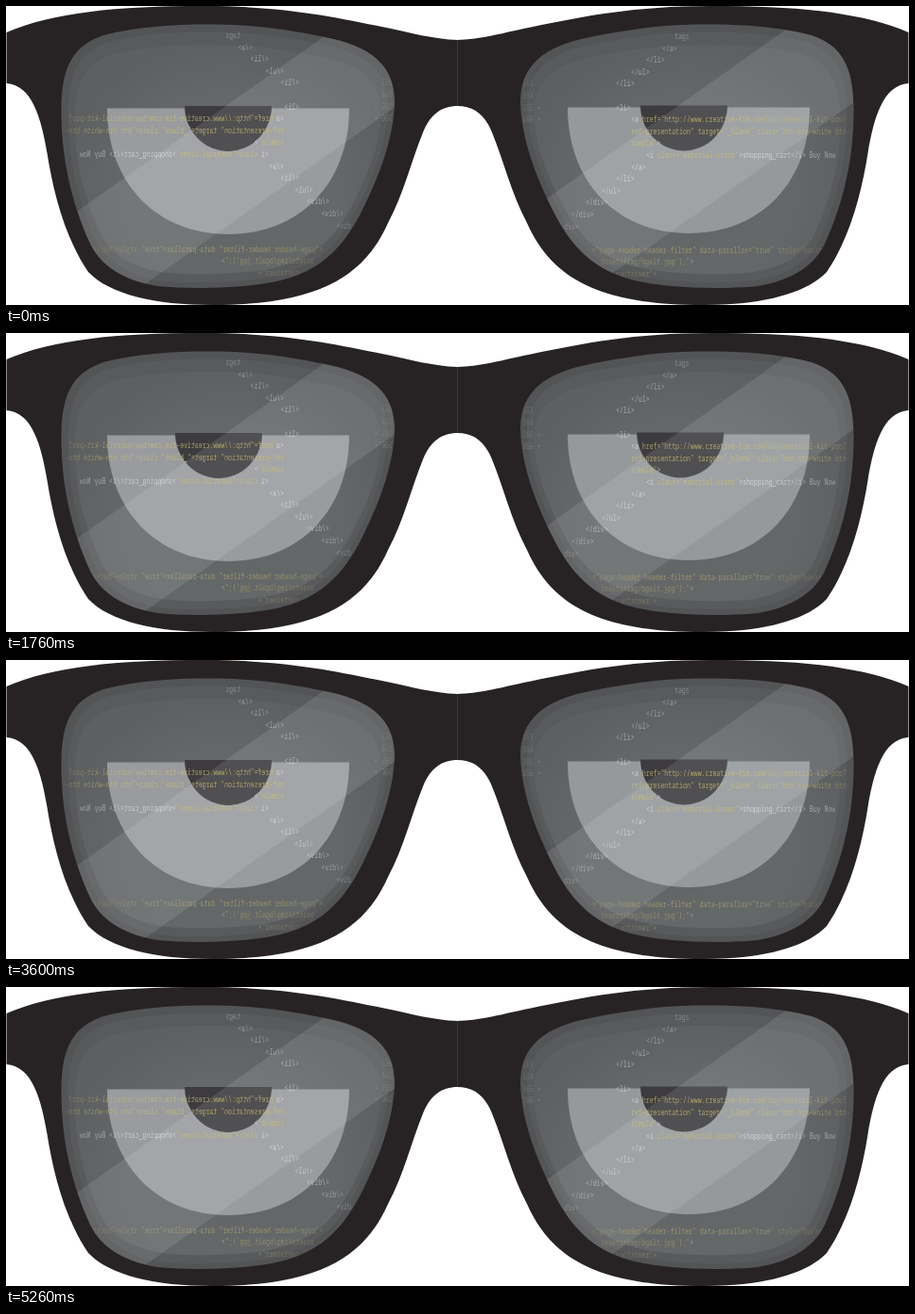
These frames come from a looping animation (955 by 317 pixels, 6 s). An HTML page:

```html
<!DOCTYPE html>
<html lang="en">
<head>
<meta charset="utf-8">
<title>Glasses</title>
<style>
  html, body { margin: 0; width: 100%; height: 100%; overflow: hidden; background: #fff; }
  svg { display: block; width: 100%; height: 100%; }
  text { font: 8.2px "Noto Sans Mono", "DejaVu Sans Mono", monospace; white-space: pre; }
  .tag { fill: #e4e5e6; }
  .attr { fill: #cfc272; }
  .eye { transform-origin: 0 159.5px; }
</style>
</head>
<body>
<svg viewBox="0 0 955 317" xmlns="http://www.w3.org/2000/svg">
  <defs>
    <path id="lens" d="M58.500 108 C59 64 71 42 103 31 C140 21 185 19 225 19.500 C265 20 302 26 335 32.500 C385 42 411 62 411 102 C410 140 395 180 377 216 C358 254 335 280 290 291 C258 299 200 301 160 297 C126 291 101 277 89 252 C69 208 58 160 58.500 108 Z"/>
    <path id="rim" d="M.5 28 C50 7 115 0 210 0 C290 0 345 11 400 22.500 C430 28.500 450 35 478 36 V106 C460 106 449 115 441 134 C428 166 421 198 404 230 C379 286 332 317 218 317 C158 317 110 306 87 282 C62 245 50 197 43.500 156 C37 119 28 84 .5 82 Z"/>
    <path id="eye" d="M-128 108 H128 C128 187 76 241.500 0 241.500 C-76 241.500 -128 187 -128 108 Z"/>
    <path id="pupil" d="M-46 106 H46 A46 48 0 0 1 -46 106 Z"/>
    <path id="glare" d="M50 235.600 L360 15.500 L440 30 V87 L130 307 Z"/>
    <radialGradient id="tint" gradientUnits="userSpaceOnUse" cx="0" cy="0" r="1"
      gradientTransform="translate(236 195) scale(196 182)">
      <stop offset="0" stop-color="#626466"/>
      <stop offset=".6" stop-color="#656869"/>
      <stop offset="1" stop-color="#5d5f61"/>
    </radialGradient>
    <radialGradient id="fade" gradientUnits="userSpaceOnUse" cx="0" cy="0" r="1"
      gradientTransform="translate(728 158) scale(190 150)">
      <stop offset=".35" stop-color="#fff"/>
      <stop offset=".7" stop-color="#aaa"/>
      <stop offset="1" stop-color="#333"/>
    </radialGradient>
    <mask id="soft" maskUnits="userSpaceOnUse" x="478" y="0" width="477" height="317">
      <rect x="478" width="477" height="317" fill="url(#fade)"/>
    </mask>
    <clipPath id="clipL"><use href="#lens"/></clipPath>
    <clipPath id="clipR"><use href="#lens" transform="matrix(-1 0 0 1 955 0)"/></clipPath>
    <g id="side">
      <use href="#rim" fill="#272324"/>
      <use href="#lens" fill="#535456"/>
      <use href="#lens" fill="#595a5c" transform="translate(236 180) scale(.96 .95) translate(-236 -180)"/>
      <use href="#lens" fill="url(#tint)" transform="translate(236 185) scale(.92 .87) translate(-236 -185)"/>
    </g>
    <g id="code" mask="url(#soft)" opacity=".75"></g>
  </defs>

  <use href="#side"/>
  <use href="#side" transform="matrix(-1 0 0 1 955 0)"/>
  <path d="M477.500 36 V106" stroke="#4a4748" stroke-width=".6"/>

  <g clip-path="url(#clipL)">
    <g class="eye"><use href="#eye" x="235" y=".5" fill="#999b9f"/></g>
    <g id="pupilL"><use href="#pupil" x="235" fill="#3d3b3e"/></g>
    <use href="#glare" fill="#fff" opacity=".1"/>
    <use href="#code" transform="matrix(-1 0 0 1 955 -1)"/>
  </g>
  <g clip-path="url(#clipR)">
    <g class="eye"><use href="#eye" x="722" y="-.5" fill="#96999c"/></g>
    <g id="pupilR"><use href="#pupil" x="717" y="-.5" fill="#3d3b3e"/></g>
    <use href="#glare" x="478" fill="#fff" opacity=".1"/>
    <use href="#code"/>
  </g>
</svg>
<script>
const NS = 'http://www.w3.org/2000/svg';
const LOOP = 6000;
const $ = id => document.getElementById(id);

// x, row, text; parts between ~ marks take the attribute colour
const lines = [
  [707, 0, 'tags'],
  [694, 1, '</a>'],
  [677, 2, '</li>'],
  [661, 3, '</ul>'],
  [645, 4, '</li>'],
  [546, 4, '163'],
  [546, 5, '164'],
  [546, 6, '165 ▾'],
  [645, 6, '<li>'],
  [546, 7, '166 ▾'],
  [661, 7, '<a ~href="http://www.creative-tim.com/buy/material-kit-pro?'],
  [661, 8, '~ref-presentation" target="_blank" class="btn btn-white btn-'],
  [661, 9, '~simple"~>'],
  [677, 10, '<i ~class="material-icons"~>shopping_cart</i> Buy Now'],
  [661, 11, '</a>'],
  [645, 12, '</li>'],
  [630, 13, '</ul>'],
  [613, 14, '</div>'],
  [598, 15, '</div>'],
  [590, 16, 'div>'],
  [620, 18, '~="page-header header-filter" data-parallax="true" style="backg'],
  [629, 19, '~assets/img/bgalt.jpg\');"~>'],
  [645, 20, '~container"~>']
];

for (const [x, row, str] of lines) {
  const text = document.createElementNS(NS, 'text');
  text.setAttribute('transform', `translate(${x} ${35 + row * 12.6}) scale(.8 1)`);
  str.split('~').forEach((part, i) => {
    const span = document.createElementNS(NS, 'tspan');
    span.setAttribute('class', i % 2 ? 'attr' : 'tag');
    span.textContent = part;
    text.append(span);
  });
  $('code').append(text);
}

const EASE = 'cubic-bezier(.333,0,.667,1)';
const SETTLE = 'cubic-bezier(.167,.167,.667,1)';
const LEAVE = 'cubic-bezier(.333,0,.833,.833)';

// steps: [ms, value, easing to the next step]
function play(el, prop, steps, show) {
  const frames = steps.map(([ms, v, easing = 'linear']) =>
    ({ offset: ms / LOOP, [prop]: show(v), easing }));
  el.animate(frames, { duration: LOOP, iterations: Infinity });
}

function look(el, left, right) {
  play(el, 'transform', [
    [0, 0, SETTLE], [1200, left, EASE], [2400, right, LEAVE], [3600, 0], [LOOP, 0]
  ], v => `translateX(${v}px)`);
  play(el, 'opacity', [
    [0, 1], [4800, 1], [4833, 0], [5227, 0], [5260, 1], [LOOP, 1]
  ], v => v);
}

look($('pupilL'), -83, 78.5);
look($('pupilR'), -79, 87.5);

for (const eye of document.querySelectorAll('.eye')) {
  play(eye, 'transform', [
    [0, 1], [4800, 1, SETTLE], [5030, 0, LEAVE], [5260, 1], [LOOP, 1]
  ], v => `scaleY(${v})`);
}
</script>
</body>
</html>
```
